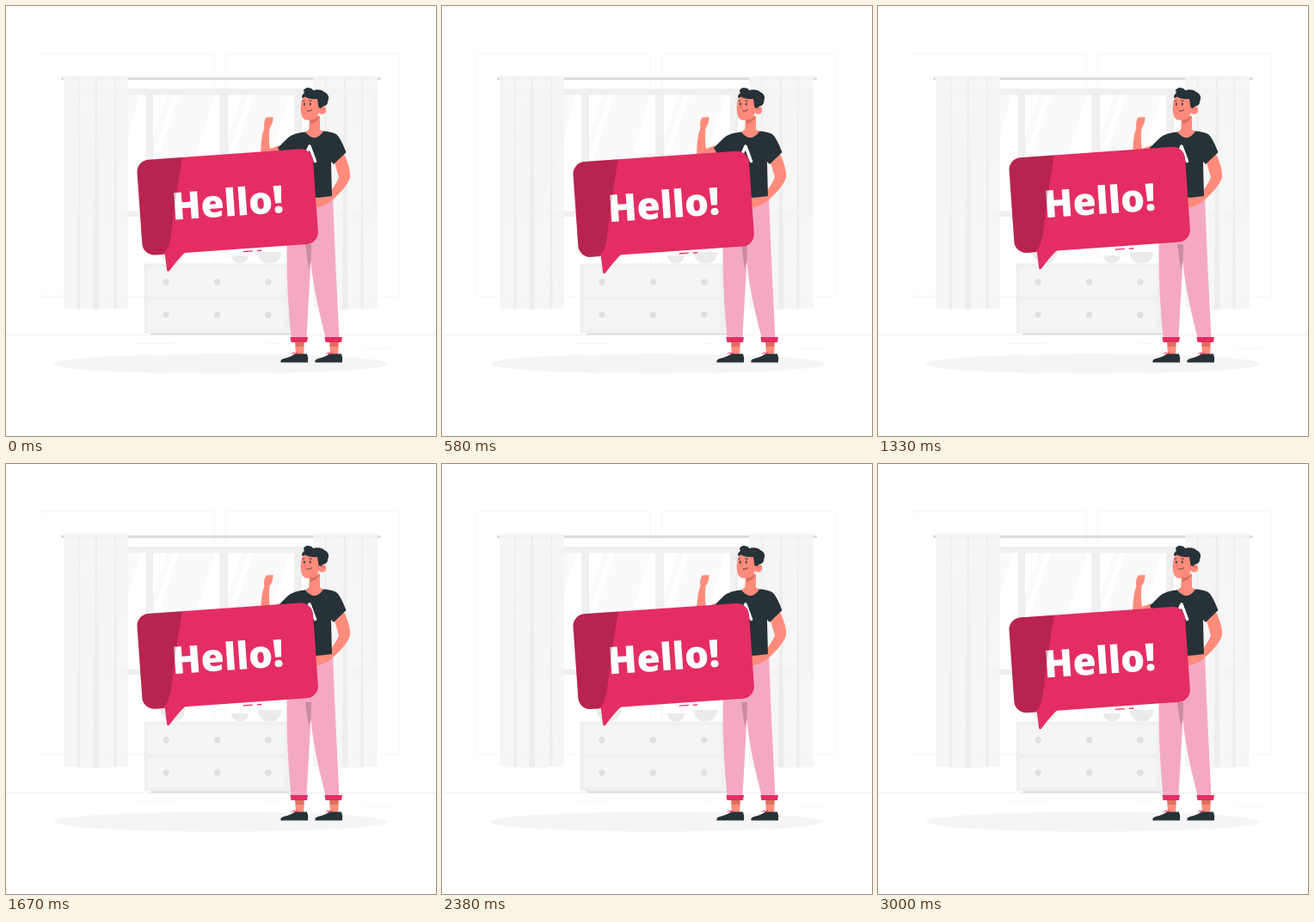
An HTML page for the animation above (3040 ms loop, 500 by 500 pixels).

```html
<!DOCTYPE html>
<html lang="en">
<head>
<meta charset="utf-8">
<title>Hello</title>
<style>
html, body { margin: 0; width: 100%; height: 100%; overflow: hidden; background: #fff }
svg { display: block; width: 100%; height: 100% }
text { font: 800 44px "Open Sans", Arial, sans-serif; text-anchor: middle; fill: #fff }
</style>
</head>
<body>
<svg viewBox="0 0 500 500">
  <defs>
    <g id="pane">
      <path fill="#fafafa" d="M0 103H78V239H0Z"/>
      <path fill="#fff" d="M0 103H18L0 156ZM24 103H31L0 196V176ZM73 103H78V239H30Z"/>
    </g>
    <g id="drawer">
      <path fill="#f5f5f5" d="M165 304H324V338H165Z"/>
      <g fill="#e0e0e0"><circle cx="186" cy="321" r="3.7"/><circle cx="245.500" cy="321" r="3.700"/><circle cx="305" cy="321" r="3.700"/></g>
    </g>
    <g id="curtain">
      <path fill="#f5f5f5" opacity=".88" d="M0 81H75V351Q68 354 60 351Q50 355 38 352Q28 355 18 352Q8 354 0 351Z"/>
      <path fill="#ebebeb" opacity=".8" d="M17 83H18.500L19.500 353H16.500ZM37 83H39L41 353H34.500ZM59.500 83H61L61.500 352H58.500Z"/>
    </g>
    <g id="foot">
      <path fill="#ff8b7b" d="M336 389H347L346 407H337Z"/>
      <path fill="#d9705f" d="M336.500 391H346.500L346 396H337Z"/>
      <path fill="#263238" d="M319.500 414.500Q318.500 411 323 410Q331 408 336 404.500L350 404.500Q352 409 351 414.500Z"/>
      <path fill="none" stroke="#e42d63" d="M332 405Q335 401 337 405M335 405L339 403"/>
      <path fill="#e42d63" d="M330.500 385H351L350 391H331.500Z"/>
    </g>
  </defs>

  <!-- room -->
  <g fill="none" stroke="#f7f7f7">
    <path d="M39.500 55.500H242.500V337.500H39.500ZM255.500 55.500H457.500V337.500H255.500Z"/>
    <path stroke="#f0f0f0" d="M0 382.500H500"/>
    <path d="M415 398.500H448M150 392.500H196M302 392.500H319"/>
  </g>
  <use href="#pane" x="84"/><use href="#pane" x="170"/><use href="#pane" x="257"/><use href="#pane" x="343"/>
  <path fill="#f0f0f0" d="M72 96H432V103.500H72ZM72 238.500H432V245H72ZM72 103H80V240H72ZM162 103H170V240H162ZM248 103H257V240H248ZM335 103H343V240H335ZM424 103H432V240H424Z"/>
  <path fill="#fff" d="M155 103.500H162V238.500H155Z"/>
  <path fill="none" stroke="#e6e6e6" d="M170 103V239M257 103V239M343 103V239M80 103V239"/>
  <path stroke="#dcdcdc" stroke-width="2.800" d="M64 84.500H436"/>
  <use href="#curtain" x="67"/>
  <use href="#curtain" transform="matrix(-1 0 0 1 432 0)"/>

  <!-- dresser -->
  <path fill="#e0e0e0" d="M168 379H340V382.500H168Z"/>
  <path fill="#f0f0f0" d="M160.500 299.500H331V380.500H160.500Z"/>
  <use href="#drawer"/><use href="#drawer" y="38"/>
  <path fill="#ebebeb" d="M262 290H282Q281 299.500 272 299.500Q263 299.500 262 290ZM292.500 286H320.500Q319 299.500 306.500 299.500Q294 299.500 292.500 286Z"/>
  <circle cx="194" cy="285" r="14.500" fill="#ebebeb"/>
  <ellipse cx="250" cy="416" rx="194" ry="11.500" fill="#f5f5f5"/>

  <!-- man -->
  <use href="#foot"/><use href="#foot" x="40"/>
  <path fill="#f4a9c3" d="M329 220H380Q383 300 387.500 385H371.500Q357 330 354.500 296Q352 340 349.500 385H331.500Q323 300 329 220Z"/>
  <path fill="#c98aa2" d="M348 277H355L354.500 298Q353 300 352 305Z"/>
  <g fill="#ff8b7b">
    <path d="M296 180Q296 152 300.500 142Q299 135 302.500 129.500L310.500 129Q311 136 306.500 142Q305 155 307 166L318 162L323 180Z"/>
    <path d="M382 182L393 172Q401 189 400 199Q398 209 379 226Q370 234 357 235V224Q366 221 374 220Q385 206 387 199Z"/>
    <path d="M353 128H365V150Q358 156 352 150Z"/>
  </g>
  <path fill="#d9705f" d="M353 132Q360 133 365 127Q363 135 354 137Z"/>
  <path fill="#263238" d="M352 146Q334 147 327 154L316 165L323 177L329 176V222Q354 225 379 221L378 181L381 184L395.500 170Q389 153 384 149Q376 145 366 145.500Q357 159 352 146Z"/>
  <path fill="#ff8b7b" d="M348 146.500L353 143H364L369 146Q359 160 348 146.500Z"/>
  <path fill="none" stroke="#fff" stroke-width="3.500" stroke-linejoin="round" stroke-linecap="round" d="M345 181L353 163L359.500 180.500"/>
  <path fill="#ff8b7b" d="M345 106Q341 118 344 128Q346 134 354 132.500Q363 131 364 123L365 106Q356 99 345 106Z"/>
  <circle cx="367.500" cy="121" r="4.800" fill="#ff8b7b"/>
  <path fill="#263238" d="M344.500 107Q343 104 347 101Q344 97 350 95Q356 95 357 98Q366 96 370 100Q377 103 374.500 110Q374 116 369 116.500L366 119L363.500 118L362 108Q353 109 348 105.500Z"/>
  <g fill="none" stroke="#263238" stroke-width=".8">
    <path d="M344.500 110.500L347.500 110M352 110L356 110.500M349.500 122Q353 123 356 120.500"/>
    <path stroke="#d9705f" d="M349 113L347 118.500H349.500M366 120Q369 119 370 121"/>
  </g>
  <path fill="#263238" d="M346 112.500h1.500v3h-1.500ZM353 112.500h1.500v3h-1.500Z"/>

  <!-- speech bubble, floating -->
  <g id="bubble">
    <rect x="-102.500" y="-55.500" width="205" height="111" rx="14" fill="#e42d63"/>
    <path fill="#e42d63" d="M-77 54H-52Q-60 60 -73 75Q-75.500 77 -76 74Z"/>
    <path fill="none" stroke="#e42d63" stroke-width="1.300" d="M14 58.800H25M30 59H35.500"/>
    <text y="16.500">Hello!</text>
    <path opacity=".2" d="M-88.500 -55.500H-49Q-60 -11 -67.500 30Q-72 55.500 -83 55.500H-88.500A14 14 0 0 1 -102.500 41.500V-41.500A14 14 0 0 1 -88.500 -55.500Z"/>
  </g>
</svg>
<script>
const LOOP = 3040, LOWEST = 475, RANGE = 10;
const bubble = document.getElementById("bubble");

function draw() {
  const phase = (performance.now() + LOOP - LOWEST) % LOOP / LOOP;
  const rise = RANGE * (1 - Math.abs(1 - 2 * phase));
  bubble.setAttribute("transform", `translate(257.7 ${231 - rise}) rotate(-4)`);
  requestAnimationFrame(draw);
}
draw();
</script>
</body>
</html>
```
